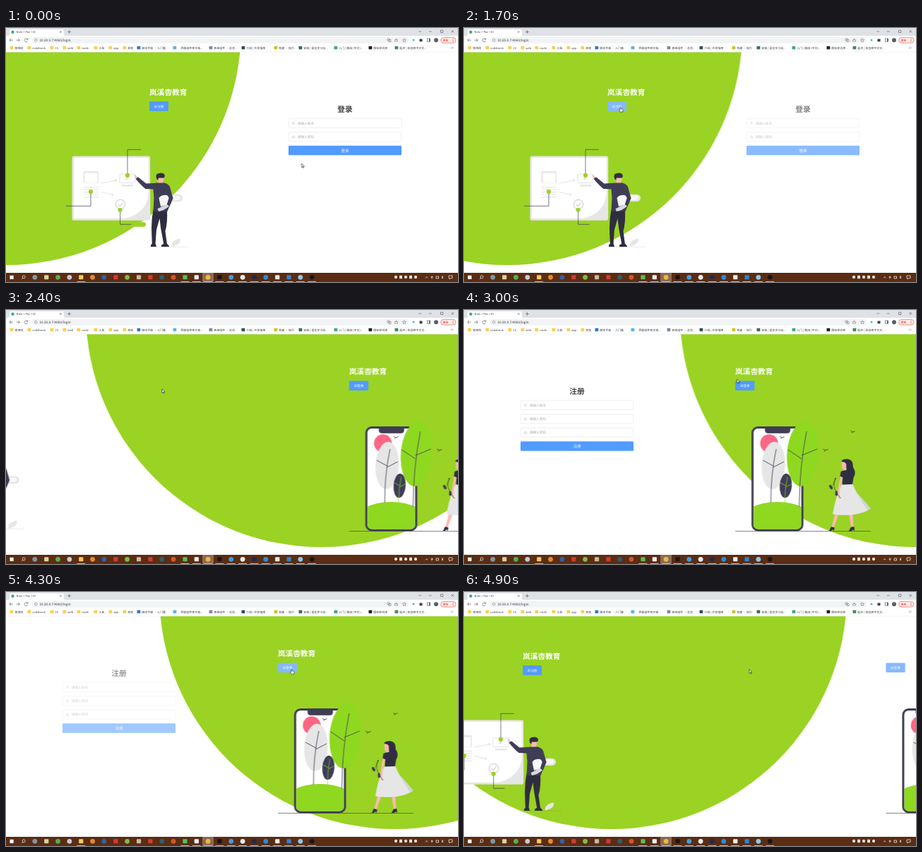
An HTML page for the animation above (5 s loop, 640 by 360 pixels).

```html
<!DOCTYPE html>
<html>
<head>
<meta charset="utf-8">
<title>Login</title>
<style>
  html, body { margin: 0; width: 100%; height: 100%; overflow: hidden; background: #fff; }
  svg { display: block; width: 100vw; height: 100vh; }
  text { font-family: "Noto Sans CJK SC", "Noto Sans CJK", "Noto Sans", sans-serif; text-rendering: geometricPrecision; }
  .title { font-size: 10.7px; font-weight: 700; }
  .mid { text-anchor: middle; }
  .small { font-size: 4.67px; }
  .tiny { font-size: 4px; fill: #3c4043; }
  .btn { fill: #529bff; }
  .line { fill: none; stroke: #3f3d56; stroke-width: .7; }
  .grey { fill: none; stroke: #dcdce0; stroke-width: .8; }
  .field { fill: #fff; stroke: #dcdfe6; stroke-width: .5; }
  .dark { fill: #3f3d56; }
  .ink { fill: #2f2e41; }
  .skin { fill: #fbb9b4; }
  .pale { fill: #e6e6e6; }
  .lime { fill: #9ad323; }
  .leaf { fill: #8fd820; }
  .icon { fill: none; stroke: #5f6368; stroke-width: .7; }

  .move { animation: 5s ease-in-out infinite; }
  #blob { animation-name: blob; }
  #left { animation-name: left; }
  #right { animation-name: right; }
  #forms { animation-name: forms; }
  #signin { animation-name: signin; }
  #signup { animation-name: signup; }
  #goSignup { animation-name: hoverLeft; }
  #goSignin { animation-name: hoverRight; }
  #cursor { animation-name: cursor; }
  #arrow { animation-name: arrow; animation-timing-function: step-end; }
  #hand { animation-name: hand; animation-timing-function: step-end; }

  /* the way back is cut by the loop, so its easing is the first part of ease-in-out */
  @keyframes blob {
    0%, 26.5% { transform: translateX(0); }
    61.3% { transform: translateX(641px); }
    76.9% { transform: translateX(641px); animation-timing-function: cubic-bezier(.433, 0, .684, .61); }
    100% { transform: translateX(154.5px); }
  }
  @keyframes left {
    0%, 34.45% { transform: translateX(0); }
    56.45% { transform: translateX(-333.3px); }
    85.2% { transform: translateX(-333.3px); animation-timing-function: cubic-bezier(.433, 0, .68, .62); }
    100% { transform: translateX(-74.5px); }
  }
  @keyframes right {
    0%, 34.45% { transform: translateX(333.3px); }
    56.45% { transform: translateX(0); }
    85.2% { transform: translateX(0); animation-timing-function: cubic-bezier(.433, 0, .68, .62); }
    100% { transform: translateX(258.8px); }
  }
  @keyframes forms {
    0%, 40.1% { transform: translateX(0); }
    60.1% { transform: translateX(-320px); }
    90.5% { transform: translateX(-320px); animation-timing-function: cubic-bezier(.43, 0, .72, .54); }
    100% { transform: translateX(-172px); }
  }
  /* the next form appears only while the circle covers it */
  @keyframes signin {
    0%, 26.1% { opacity: 1; }
    46.1% { opacity: 0; }
    97% { opacity: 0; animation-timing-function: step-start; }
    100% { opacity: 1; }
  }
  @keyframes signup {
    0% { opacity: 0; }
    46% { opacity: 0; animation-timing-function: step-start; }
    47%, 76.5% { opacity: 1; }
    96.5%, 100% { opacity: 0; }
  }
  @keyframes hoverLeft {
    0%, 18.5% { fill: #529bff; }
    20.5%, 66% { fill: #85b9ff; }
    68%, 100% { fill: #529bff; }
  }
  @keyframes hoverRight {
    0%, 65% { fill: #529bff; }
    67%, 100% { fill: #85b9ff; }
  }
  @keyframes cursor {
    0%, 2% { transform: translate(418.5px, 192px); }
    16%, 19% { transform: translate(223.5px, 111px); }
    24%, 50% { transform: translate(221px, 112px); }
    60% { transform: translate(386.5px, 98px); }
    67%, 100% { transform: translate(404px, 109.5px); }
  }
  @keyframes arrow {
    0% { opacity: 1; } 16% { opacity: 0; } 37% { opacity: 1; }
    65% { opacity: 0; } 88.7%, 100% { opacity: 1; }
  }
  @keyframes hand {
    0% { opacity: 0; } 16% { opacity: 1; } 37% { opacity: 0; }
    65% { opacity: 1; } 88.7%, 100% { opacity: 0; }
  }
</style>
</head>
<body>
<svg viewBox="0 0 640 360">
  <rect width="640" height="360" fill="#fff"/>

  <g id="forms" class="move">
    <g id="signup" class="move"></g>
    <g id="signin" class="move"></g>
  </g>

  <circle id="blob" class="move lime" cx="-.5" cy="2.7" r="333.3"/>

  <g id="left" class="move">
    <text class="title" x="203" y="94.8" fill="#fff">岚溪杏教育</text>
    <rect id="goSignup" class="move btn" x="203" y="104" width="27" height="13.7" rx="1.3"/>
    <text class="small mid" x="216.5" y="112.6" fill="#fff">去注册</text>

    <!-- board -->
    <rect class="pale" x="93.5" y="181.5" width="110.7" height="91.2" rx="3"/>
    <rect x="96.2" y="184" width="105.6" height="86" rx="1.5" fill="#fff"/>
    <path class="pale" d="M202 236Q198 264 166 270.5H202Z"/>
    <rect class="pale" x="109.5" y="203" width="21.5" height="17" rx="2"/>
    <rect x="111.5" y="205.5" width="18" height="14" rx="1" fill="#fff"/>
    <path class="grey" d="M110 225.5H131M110 229H131M110 232.5H131M110 236H131M110 239.5H131" stroke-width="1"/>
    <path class="grey" d="M135 220L157 215.5M154 214.2L157 215.5 155 218M135 232.5L152 236.5M149.5 234L152 236.5 149 238"/>
    <rect class="grey" x="161" y="207" width="21.5" height="12.5" rx="1"/>
    <path class="pale" d="M169.5 210.5L175 213.3 169.5 216.2ZM164 222H180V224.4H164Z"/>
    <circle class="grey" cx="162" cy="250" r="6.7" style="stroke-width:1.6"/>
    <path class="grey" d="M158.8 250L161.3 252.6 165.5 247.6" style="stroke-width:1.6"/>
    <path class="line" d="M172 209V172.3H191M120 232V252.3H84M161.7 258V278.3H178"/>
    <g class="lime">
      <circle cx="172" cy="208.8" r="3.1"/><circle cx="120" cy="232" r="3.1"/><circle cx="161.6" cy="257.8" r="3.1"/>
      <rect x="191" y="169" width="21" height="6.6" rx="3.3"/>
      <rect x="64" y="249" width="21" height="6.6" rx="3.3"/>
      <rect x="177.5" y="275.2" width="20.5" height="6.6" rx="3.3"/>
    </g>

    <!-- man -->
    <path d="M203 310.2H258" stroke="#3f3d56" stroke-width=".5" opacity=".22"/>
    <path class="pale" d="M234.5 309.5Q234 301 246.5 298.3Q249 306 236 309.5Z"/>
    <rect x="224" y="235.7" width="26" height="10.4" rx="5.2" fill="#e4e4e6"/>
    <rect x="230" y="237.6" width="17" height="6.4" rx="3.2" fill="#f7f7f7"/>
    <path class="ink" d="M208.5 257H228Q229 276 225.5 288L228 306.5H223.3L219.2 284 217.5 270 213 286 211.5 306.5H206.8L206 284Q206 270 208.5 257Z"/>
    <path class="ink" d="M205 310V307.5L207 305.7H211.8L213 310ZM220 310V307.8L223.3 305.7H228L231 309V310Z"/>
    <path class="skin" d="M215.3 211H223.3V216L221.5 218.6V222H215.5V217.5Z"/>
    <path class="ink" d="M212.5 211Q212 206 217.5 205.7Q224.3 204.8 225 210L223.5 212.5H216L215.2 215.5Q212.7 214 212.5 211Z"/>
    <path class="skin" d="M186.5 213.5L184.7 209.5 181.8 207.3 182.3 210.5 184.5 215Z"/>
    <path class="dark" d="M214.5 219.5H224.5Q230 221 232 225L236.5 241 230.5 255 228.5 260H208.5L209.5 240 208.5 228.5 197.5 228Q192 224 183.5 213.8L187 211.2 198.5 220.6Z"/>
    <path d="M216.5 241Q220 236 228 237L234 243.5Q232 250 226 251L219 253Z" fill="#f6f6f7"/>
    <path class="dark" d="M230 232L236.5 241 231.5 253 227.5 251 230.5 241.5Z"/>
    <path d="M214.5 256.3Q220 253.5 227.5 249.8L231 252.6Q224 259 216 260Z" fill="#d9d9de"/>
  </g>

  <g id="right" class="move">
    <text class="title" x="384" y="91.3" fill="#fff">岚溪杏教育</text>
    <rect id="goSignin" class="move btn" x="384" y="100.5" width="27.3" height="13.5" rx="1.3"/>
    <text class="small mid" x="397.6" y="109" fill="#fff">去登录</text>

    <!-- phone and trees -->
    <clipPath id="screen"><rect x="410" y="168" width="67.5" height="142.5" rx="6"/></clipPath>
    <rect class="dark" x="407" y="165" width="73.5" height="148.5" rx="9"/>
    <g clip-path="url(#screen)">
      <rect x="407" y="165" width="74" height="149" fill="#fff"/>
      <circle cx="432" cy="189" r="12.7" fill="#ff6584"/>
      <ellipse class="leaf" cx="443.5" cy="303" rx="54" ry="31"/>
    </g>
    <path class="dark" d="M426 167H462V170Q462 174.8 457.5 174.8H430.5Q426 174.8 426 170Z"/>
    <ellipse class="pale" cx="438" cy="220.3" rx="16.6" ry="33.6" transform="rotate(3 438 220)"/>
    <path class="line" d="M442 197Q434 235 434.5 273M438 221L423 213M437.5 223L453 215" style="stroke-width:.85"/>
    <ellipse class="dark" cx="455.5" cy="249" rx="8.6" ry="17.2" transform="rotate(4 455 249)"/>
    <path d="M457.8 236.5Q454 255 454.2 273M455.8 249L448 245M455.3 251L463 247" fill="none" stroke="#8fd820" stroke-width=".7"/>
    <ellipse class="leaf" cx="479.5" cy="204" rx="22.3" ry="46" transform="rotate(4 479 204)"/>
    <path class="line" d="M485 172Q475 222 474.5 279M478 211L458.5 198M478 206L500 197" style="stroke-width:.85"/>
    <path class="line" d="M447 179L450 181 453.5 179.6M450 181L448.5 182.6M508.5 197L511.5 199 515.5 197.6M511.5 199L510 200.6M547.5 171L550 173 553.5 171.8M550 173L548.5 174.4" style="stroke-width:.9"/>
    <path class="line" d="M384 313.6H576"/>

    <!-- woman -->
    <path class="skin" d="M526 286L520 309H523.3L531.5 287ZM544.5 286L548.3 309H551.2L550.5 286Z"/>
    <path class="ink" d="M517 313.3Q518 310.5 520 307L524.7 308.5 523.5 313.3 522 311 519.5 313.3ZM544.8 313.3L548 307.5 552.5 307.3 553 313.3 551.3 311.5 548 313.3Z"/>
    <path d="M545 249Q557 258 576 281.5Q566 289 550 290Z" fill="#d2d2d4"/>
    <path d="M535 246.5L550 246Q556 262 571.5 283.5Q552 294 522 289.5Q526 264 535 246.5Z" fill="#e6e6e6"/>
    <path class="ink" d="M534.5 214Q537 210.5 543 211.3Q550 212 550.5 219Q550 223 553 227Q555 234 550.5 238L541 232 540 222Z"/>
    <path class="skin" d="M535 215.5Q539 214.5 541 218L541.5 228H536.8V224.5H535.3Z"/>
    <path class="ink" d="M533.5 229Q540 225.5 549 228.5L552 234 550 247 535.5 247.5 536 238 532.3 236Z"/>
    <path class="skin" d="M532.8 235.5L536.3 237.5 532.5 252 531.3 263 534 266.5 531.5 267.5 528.3 262Z"/>
    <path class="line" d="M526.5 238Q518 249 533 267M522.5 248.5L526 239.5"/>
    <ellipse class="dark" cx="519.5" cy="251" rx="1.9" ry="3.4" transform="rotate(-30 519.5 251)"/>
    <ellipse class="dark" cx="527.3" cy="260" rx="1.8" ry="3.4"/>
    <circle class="dark" cx="525.8" cy="239" r=".9"/>
  </g>

  <!-- browser -->
  <rect width="640" height="12" fill="#dee1e6"/>
  <path d="M3 11.5Q5 11 5 9V4Q5 2 7 2H80Q82 2 82 4V9Q82 11 84 11.5Z" fill="#fff"/>
  <rect y="11" width="640" height="23.2" fill="#fff"/>
  <circle cx="9.5" cy="5.7" r="2.2" fill="#41a883"/>
  <text class="tiny" x="14.5" y="7.2">Nolo + Pav + ID</text>
  <path class="icon" d="M76 4.2L78.6 6.8M78.6 4.2L76 6.8M87 5.5H92M89.5 3V8M584.5 4L586.3 5.8 588 4M599 5H602.6M615.5 3.2H618.8V6.5H615.5ZM630.6 3.2L634 6.6M634 3.2L630.6 6.6"/>
  <path class="icon" d="M10 17.2H5M7.3 14.8L5 17.2 7.3 19.6M14.5 17.2H19.5M17.2 14.8L19.5 17.2 17.2 19.6M30.6 16A2.4 2.4 0 1 0 30.7 18.4M30.9 14.3V16.3H28.9"/>
  <rect x="37" y="12.7" width="533" height="9" rx="4.5" fill="#f1f3f4"/>
  <circle class="icon" cx="42.3" cy="17.2" r="1.8" style="stroke-width:.5"/>
  <text x="47.5" y="18.9" style="font-size:4.7px" fill="#303236">10.20.0.7:4060/login</text>
  <path class="icon" d="M540 15H543V18H540ZM542 16.5H545V19.5H542ZM550.5 19V16.5H554.5V19ZM552.5 17V14.5M564 14.7L564.8 16.4 566.6 16.6 565.2 17.8 565.6 19.5 564 18.6 562.4 19.5 562.8 17.8 561.4 16.6 563.2 16.4Z" style="stroke-width:.5"/>
  <circle cx="577" cy="17.2" r="1.4" fill="#4bb6c6"/>
  <path d="M585.5 15.5H589.5V19.3H585.5Z" fill="#3c4043"/>
  <rect class="icon" x="596.6" y="15" width="4" height="4.2"/>
  <path d="M599 15H600.6V19.2H599Z" fill="#5f6368"/>
  <circle cx="609" cy="17.2" r="3" fill="#56606b"/>
  <rect x="615.6" y="13.4" width="21.4" height="7.8" rx="3.9" fill="#fdebe9" stroke="#d93025" stroke-width=".5"/>
  <text class="tiny" x="618.5" y="18.8" style="fill:#d93025">更新</text>
  <path d="M633 15.2V19.6" stroke="#d93025" stroke-width=".9" stroke-dasharray=".9 .8"/>
  <g id="marks"></g>
  <path class="icon" d="M630 26.5L631.4 28 630 29.5M632 26.5L633.4 28 632 29.5" style="stroke-width:.5"/>
  <path d="M0 34.2H640" stroke="#e2e4e7" stroke-width=".4"/>

  <!-- taskbar -->
  <rect y="347" width="640" height="13" fill="#5a2d14"/>
  <rect x="278" y="347" width="16" height="13" fill="#8c6a57"/>
  <rect x="5.5" y="350.8" width="5.2" height="5.2" fill="#fff"/>
  <path d="M22.3 356L24 354.3" stroke="#fff" stroke-width=".8"/>
  <circle cx="25.2" cy="352.8" r="2" fill="none" stroke="#fff" stroke-width=".7"/>
  <g id="apps"></g>
  <path d="M594 354.4L595.6 352.6 597.2 354.4M603 351.5V355.5M601.5 353H605M609 352H612.5V355H609ZM617 351.5L619 355M619 351.5L617 355M627 351H632V354.6H629.5L628 356V354.6H627Z" fill="none" stroke="#fff" stroke-width=".7"/>

  <g id="cursor" class="move">
    <path id="arrow" class="move" d="M0 0V5.6L1.3 4.4 2.2 6.4 3.1 6 2.2 4.1H4Z" fill="#fff" stroke="#111" stroke-width=".6"/>
    <path id="hand" class="move" d="M-.2 .6Q.5-.3 1.2.6V2.6L3.6 3.1Q4.3 3.4 4.2 4.3L3.6 7H.2L-1.6 4.4Q-1.4 3.4-.2 4.1Z" fill="#fff" stroke="#111" stroke-width=".6"/>
  </g>
</svg>
<script>
  const $ = id => document.getElementById(id);

  const field = (y, hint, icon) =>
    `<rect class="field" x="400.2" y="${y}" width="159.6" height="13.2" rx="1.3"/>
     <g transform="translate(407 ${y + 6.6})" fill="none" stroke="#a8abb2" stroke-width=".4">${icon}</g>
     <text class="small" x="412.8" y="${y + 8.4}" fill="#a8abb2">${hint}</text>`;
  const user = '<circle cy="-.9" r="1"/><path d="M-1.7 2Q-1.7.5 0 .5T1.7 2"/>';
  const lock = '<path d="M-1.6-.3H1.6V2H-1.6ZM-.9-.3V-1Q0-2.4.9-1V-.3"/>';

  function form(name, hints) {
    const y = 128.2 + hints.length * 19.4;
    const rows = hints.map((h, i) => field(128.2 + i * 19.4, h, i ? lock : user)).join("");
    return `<text class="title mid" x="480" y="118.7" fill="#444">${name}</text>${rows}
      <rect class="btn" x="400" y="${y - .2}" width="160" height="13.5" rx="1.3"/>
      <text class="mid" x="480" y="${y + 8.6}" font-size="5.6" fill="#fff">${name}</text>`;
  }
  $("signin").innerHTML = form("登录", ["请输入账号", "请输入密码"]);
  $("signup").innerHTML = form("注册", ["请输入账号", "请输入密码", "请确认密码"]);

  const folder = "#f6cf57";
  $("marks").innerHTML = [
    [8, "常用网", folder], [33, "codebook", folder], [65, "JS", folder], [83, "web", folder],
    [103, "node", folder], [127, "工具", folder], [148, "app", folder], [168, "其他", folder],
    [188, "脚本手册 · 入门篇", "#3178c6"], [239, "", "#57b5e8"], [243, "界面组件库文档...", ""],
    [290, "表单组件 · 总览...", "#7d8ca3"], [336, "介绍 | 开发指南", "#2f4f5c"], [382, "构建 · 指引", "#c9c22f"],
    [417, "安装 | 语言学习站...", "#2f6f68"], [467, "入门 | 路由 (中文)...", "#41a883"],
    [516, "图标样式库", "#222"], [553, "起步 | 状态库中文文...", "#3b8f5a"]
  ].map(([x, label, color]) =>
    (color ? `<rect x="${x - 2.5}" y="25.8" width="4.8" height="4.4" rx=".8" fill="${color}"/>` : "") +
    `<text class="tiny" x="${x + 4.3}" y="29.5">${label}</text>`).join("");

  const colors = ("#7d97a8 #d8d5a0 #55b04c #c5ccd6 #f3cb5c #e88a2d #2f62a8 #d23b2f #7fbf3f #c9b9a0 #d13a32 #2d5f73 " +
    "#d2562a #58c152 #f4f4f4 #f0b93a #16161a #3d9de0 #e9edf2 #1f2a4d #2f8ad8 #f3efe6 #2b86d1 #8cc8ee #17181c").split(" ");
  const apps = colors.map((c, i) => {
    const x = 40.8 + i * 16.35;
    const shape = i % 3 == 1 || [4, 9, 14, 21].includes(i)
      ? `<rect x="${x - 3}" y="350.3" width="6.2" height="6" rx=".8" fill="${c}"/>`
      : `<circle cx="${x}" cy="353.3" r="3.4" fill="${c}"/>`;
    const open = i == 4 || i > 12 ? `<rect x="${x - 6}" y="359" width="12" height="1" fill="#d9b79c"/>` : "";
    return shape + open;
  });
  const tray = [552, 559, 566, 573, 580].map((x, i) =>
    `<rect x="${x - 2}" y="350.8" width="4" height="4.4" rx="${i % 2 ? .5 : 2}" fill="#e9e4e0"/>`);
  $("apps").innerHTML = apps.concat(tray).join("");
</script>
</body>
</html>
```
